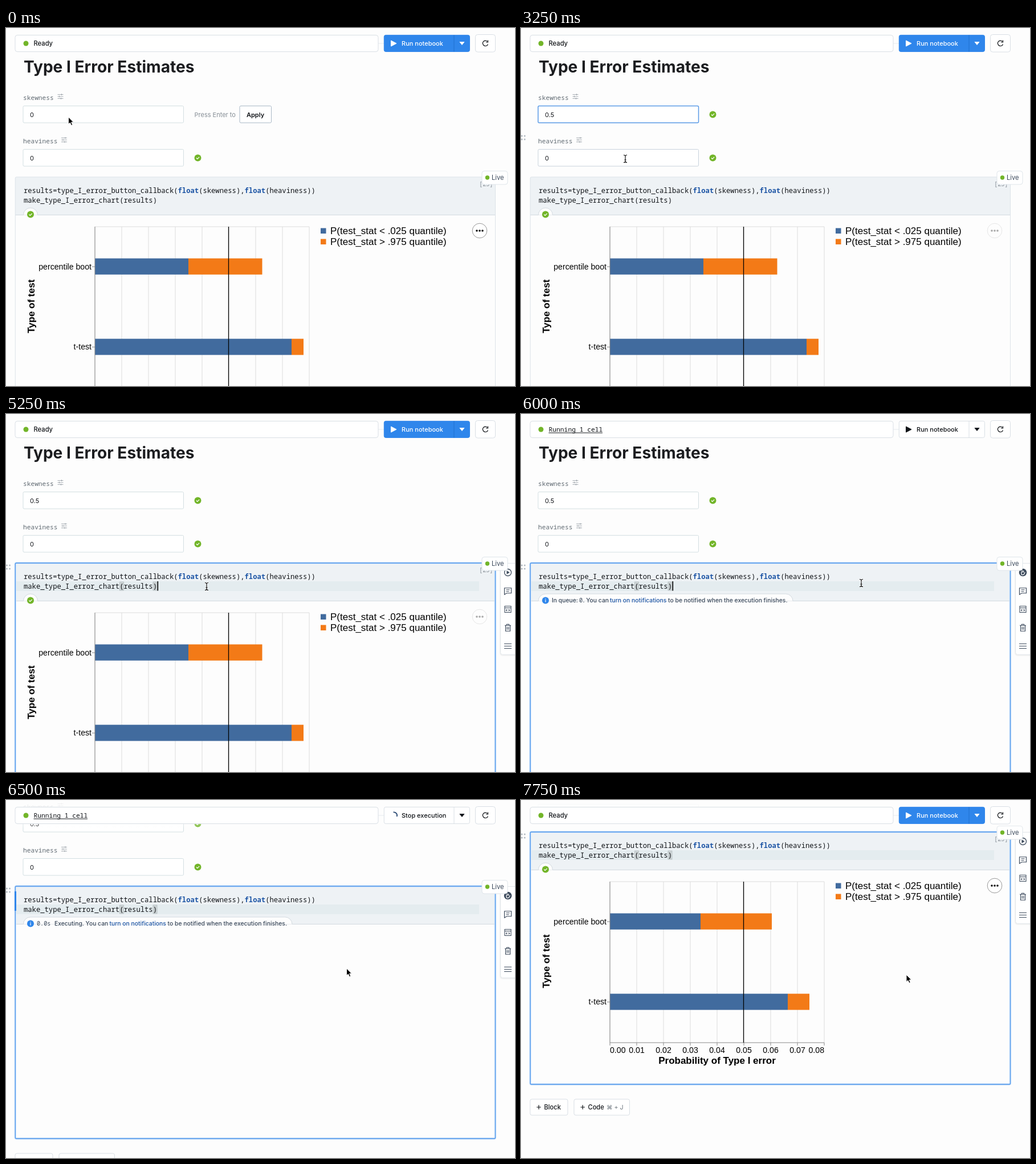
An HTML page for the animation above (8 s loop, 893 by 627 pixels).

```html
<!DOCTYPE html>
<html lang="en">
<head>
<meta charset="utf-8">
<style>
html, body { margin: 0; width: 100%; height: 100%; overflow: hidden; background: #fdfdfd; }
svg { display: block; width: 893px; height: 627px; font-family: Inter, sans-serif; }
.mono { font-family: "Noto Sans Mono", "DejaVu Sans Mono", monospace; }
.chart { font-family: "Liberation Sans", Arial, sans-serif; }
</style>
</head>
<body>
<svg id="stage" viewBox="0 0 893 627"></svg>
<script>
const STEP = 250, STEPS = 32;
const INK = '#111418', SLATE = '#3c4a5c', GRAY = '#6c757d', LINE = '#d9dfe5',
      BLUE = '#2f86eb', LINK = '#1d55a5', GREEN = '#72b529', PAPER = '#fdfdfd';

// [step, x, y], linear in between
const mouse = [[0, 109.5, 156], [1, 105, 153], [2, 90, 152], [10, 90, 152], [13, 183, 229],
  [15, 250, 280], [17, 352, 302], [21, 352, 302], [24, 597, 296], [25, 597.5, 295],
  [29, 597.5, 295], [31, 676, 306]];
const scrollStops = [[24, 0], [25, 40], [26, 110], [27, 160], [28, 187], [29, 202], [30, 205]];

function along(stops, s, i) {
  let a = stops[0];
  for (const b of stops) {
    if (s <= b[0]) return b === a ? a[i] : a[i] + (b[i] - a[i]) * (s - a[0]) / (b[0] - a[0]);
    a = b;
  }
  return a[i];
}

const text = (x, y, str, size = 11, fill = INK, more = '') =>
  `<text x="${x}" y="${y}" font-size="${size}" fill="${fill}" ${more}>${str}</text>`;
const rect = (x, y, w, h, fill, more = '') =>
  `<rect x="${x}" y="${y}" width="${w}" height="${h}" fill="${fill}" ${more}/>`;
const box = (x, y, w, h, stroke = LINE, r = 3, width = 1) =>
  rect(x, y, w, h, '#fff', `rx="${r}" stroke="${stroke}" stroke-width="${width}"`);
const path = (d, stroke = INK, width = 1, fill = 'none') =>
  `<path d="${d}" fill="${fill}" stroke="${stroke}" stroke-width="${width}"/>`;
const dot = (x, y, r, fill, more = '') => `<circle cx="${x}" cy="${y}" r="${r}" fill="${fill}" ${more}/>`;
const at = (x, y, body, angle = 0) => `<g transform="translate(${x} ${y}) rotate(${angle})">${body}</g>`;
const mono = 'class="mono"', medium = 'font-weight="500"', semi = 'font-weight="600"';

const check = (x, y) => dot(x, y, 6, GREEN) + path(`M${x - 2.6} ${y}l1.9 1.9 3.4-3.5`, '#fff', 1.3);
const sliders = (x, y) => path(`M${x - 5} ${y - 3.5}h10m-10 3.5h10m-10 3.5h10M${x + 2} ${y - 5}v3m-4 .5v3m3 .5v3`, '#939ba3', .8);

function field(name, y, value, border, width, done, iconX) {
  return text(30, y - 26, name, 11.2, '#606a72', mono) + sliders(iconX, y - 31.5) +
    box(30, y - 15, 281.5, 29.5, border, 2, width) + text(42, y + 4, value) +
    (done ? check(336.5, y) :
      text(330.5, y + 4, 'Press Enter to', 11, '#868e96') + box(410, y - 15, 55.5, 29.5, '#a9b8c6', 2) +
      text(422, y + 4, 'Apply', 11, INK, semi));
}

function code(active, caret) {
  const kw = `<tspan fill="${LINK}" font-weight="600">float</tspan>`;
  let out = '';
  if (active) {
    out += rect(17, 293, 813, 17, '#e4ecef');
    for (const x of [199.5, 258]) out += rect(x, 294, 7, 15, '#cdd4d6', 'stroke="#b0b8ba" stroke-width=".7"');
  }
  out += text(31, 288.5, `results=type_I_error_button_callback(${kw}(skewness),${kw}(heaviness))`, 12.2, INK, mono) +
    text(31, 305.5, 'make_type_I_error_chart(results)', 12.2, INK, mono);
  return out + (caret ? rect(265.5, 293, 1.6, 16.5, '#000') : '');
}

function badge(right) {
  return path(`M30.5 327.5A12.5 12.5 0 0 1 43 315H${right - 12.5}A12.5 12.5 0 0 1 ${right} 327.5`, '#d3dae0', 1, PAPER);
}

function notice(seconds) {
  const queued = seconds < 0, x = queued ? 156 : 181.5, y = 330.3, size = 10.35;
  return badge(queued ? 477 : 502) + dot(43, 326.5, 6, BLUE) + path('M43 325.5v4m0-6.3v1.2', '#fff', 1.2) +
    (queued
      ? text(54, y, 'In queue:', size, SLATE, medium) + text(102, y, '0', size, SLATE, mono) +
        text(108.5, y, '. You can', size, SLATE, medium)
      : text(54, y, seconds.toFixed(1) + 's', 10.2, SLATE, mono) +
        text(85, y, 'Executing. You can', size, SLATE, medium)) +
    text(x, y, `<tspan fill="${LINK}">turn on notifications</tspan> to be notified when the execution finishes.`, size, SLATE, medium);
}

function chart(bars, menuOn) {
  const tickX = i => 156 + 47 * i;
  let out = '';
  for (let i = 0; i <= 8; i++) {
    out += path(`M${tickX(i)} 348V630`, '#dcdcdc') + path(`M${tickX(i)} 630v5`, '#888');
    const anchor = i === 0 ? 'start' : i === 8 ? 'end' : 'middle';
    out += text(tickX(i), 647.5, '0.0' + i, 14.15, '#000', `text-anchor="${anchor}"`);
  }
  out += path('M156 348H532', '#dcdcdc');
  bars.forEach(([mid, end], i) => {
    const y = 403.5 + 140.8 * i;
    out += rect(156, y, mid - 156, 28.3, '#416b9e') + rect(mid, y, end - mid, 28.3, '#f37a17') +
      path(`M151 ${y + 14.5}h5`, '#888') +
      text(150, y + 19, ['percentile boot', 't-test'][i], 14.15, '#000', 'text-anchor="end"');
  });
  out += path('M156 348V630H532', '#888') + path('M390.5 348V630', '#000', 1.3) +
    text(344, 667, 'Probability of Type I error', 17, '#000', 'text-anchor="middle" font-weight="700"') +
    at(50, 487.5, text(0, 0, 'Type of test', 17, '#000', 'text-anchor="middle" font-weight="700"'), -90);
  ['&lt; .025', '&gt; .975'].forEach((range, i) => {
    out += rect(552, 350.5 + 19 * i, 9.5, 9.5, ['#416b9e', '#f37a17'][i]) +
      text(569, 360.6 + 19 * i, `P(test_stat ${range} quantile)`, 17, '#000');
  });
  const dots = [-5, 0, 5].map(d => dot(831 + d, 355, 1.8, '#111')).join('');
  return `<g class="chart">${out}</g><g opacity="${menuOn ? 1 : .35}">` +
    dot(831, 355, 12.8, '#fff', `stroke="${menuOn ? '#999' : '#bbb'}"`) + dots + '</g>';
}

function toolbar(running) {
  const play = running
    ? dot(0, 0, 6.8, SLATE) + path('M-2.6 0v2.2q0 2 2.5 2 2 0 2.8-2.2l1-2.5M-2.5 1v-3m1.8 2v-3.5m1.8 3.5v-3', '#fff', 1.2)
    : dot(0, 0, 6, 'none', `stroke="${SLATE}" stroke-width="1.3"`) + path('M-1.8-2.8L2.8 0-1.8 2.8z', SLATE, .5, SLATE);
  const icons = [play,
    path('M-6-5H6V4H-2L-6 6.5zM-3-2H3M-3 1H2', SLATE, 1.2),
    path('M-5.5-5.5H5.5V5.5H-5.5zM-5.5-2.5H5.5M-1.2 0L-3 1.7-1.2 3.3M1.2 0L3 1.7 1.2 3.3', SLATE, 1.1),
    path('M-5.5-4H5.5M-2-4V-6H2V-4M-4-4V6H4V-4M-1.3-1.5V3.5M1.3-1.5V3.5', SLATE, 1.2),
    path('M-6.5-4H6.5M-6.5 0H6.5M-6.5 4H6.5', SLATE, 1.2)];
  return rect(866, 262, 40, 162, '#000', 'rx="5" opacity=".04"') + box(867.5, 261.5, 40, 160, '#e1e6ea', 4) +
    icons.map((icon, i) => at(880.5, 277.5 + 32.25 * i, icon)).join('');
}

function cell(s) {
  const active = s >= 17, running = s >= 24 && s < 30, executing = s >= 26 && running;
  const bars = s < 30 ? [[320, 449.5], [501, 522]] : [[315, 440], [468, 506]];
  let out = rect(16.5, 261, 842, 66.5, '#eef2f5') + path('M16 327.5H859', '#d3dae0') +
    code(active, active && !(s > 21 && s % 5 === 1));
  out += running ? notice(executing ? (s - 26) * 1.1 : -1)
    : badge(55.5) + check(43, 326.5) + chart(bars, s === 0 || s === 31);
  const frame = (color, width) => rect(16.3, 261, 842.2, 442, 'none', `rx="2" stroke="${color}" stroke-width="${width}"`);
  out += active ? frame('#cfe4fc', 3.6) + frame('#4f97ea', 1.3) : frame('#dde3e9', 1);
  if (executing) out += rect(15, 270, 3, 34 + (s - 26) * 5.5, BLUE);
  if (active) out += toolbar(running);
  if (!running) out += text(830, 277, s < 30 ? '[23]' : '[25]', 10.3, '#868e96', mono);
  return out + box(835, 250.5, 45, 23.5, '#dfe5ea', 4) + dot(844.5, 262, 3.7, GREEN) + text(852, 266, 'Live', 11.2, SLATE);
}

function header(s) {
  const running = s >= 24 && s < 30, stopping = s >= 26 && running, ink = running ? INK : '#fff';
  const spinner = at(680.5, 27, path('M-1-5.6A5.6 5.6 0 0 1 5.2 2', '#2b4a74', 1.7), (s - 26) * 105);
  return path('M653 27h10', '#e6eaee') + box(16, 12.5, 637, 29, LINE, 4) + dot(35, 27, 4.5, GREEN) +
    (running
      ? text(48.5, 31, 'Running 1 cell', 11.3, INK, mono) + path('M48.5 33H143', INK, 1)
      : text(48.5, 31, 'Ready', 11.2, INK, medium)) +
    rect(663.3, 12.4, 150.2, 29, running ? '#fff' : BLUE, `rx="3" stroke="${running ? LINE : BLUE}"`) +
    path('M786 12.4V41.4', running ? LINE : '#2070cf') +
    (stopping ? spinner : path('M675.5 22L685 27 675.5 32z', ink, 1, ink)) +
    text(694, 31, stopping ? 'Stop execution' : 'Run notebook', 11, ink, medium) +
    path('M796 24.5H804L800 29.5z', ink, .8, ink) +
    box(823.5, 11.5, 35, 30.5, LINE, 4) +
    path('M844.5 23.5A4.7 4.7 0 1 0 845.5 28.5M845.5 21.5V25H842', INK, 1.2);
}

function pointer(s) {
  const x = along(mouse, s, 1), y = along(mouse, s, 2), arrow = s === 0 || s >= 25;
  if (arrow) return at(x, y, path('M0 0V12.5L2.9 9.9 5 14.6 7.2 13.6 5.2 9H9z', '#fff', 1, '#000'));
  const beam = 'M-3-6.5Q0-6.5 0-4.5 0-6.5 3-6.5M0-5V5M-3 6.5Q0 6.5 0 4.5 0 6.5 3 6.5M-1.5 2H1.5';
  return at(x, y, path(beam, '#fff', 2.6) + path(beam, '#000', 1.1));
}

function grip(y) {
  return [1.5, 6.5].map(x => dot(x, y - 3, 1.5, '#b3bbc2') + dot(x, y + 3, 1.5, '#b3bbc2')).join('');
}

function button(x, w, label, hint = '') {
  return box(x, 729, w, 28, LINE) + path(`M${x + 11.5} 743h7.5m-3.75-3.75v7.5`, INK, 1.2) +
    text(x + 24.5, 747, label, 11.1, INK, medium) + text(x + 57, 747, hint, 10.6, GRAY);
}

function scene(s) {
  const focused = s >= 2 && s < 17, value = s < 5 ? '0' : s === 5 ? '0.' : '0.5';
  const page = text(31, 77.5, 'Type I Error Estimates', 28.1, '#1c1d20', 'font-weight="700"') +
    field('skewness', 151.5, value, focused ? '#5b9be6' : '#d3dfe2', focused ? 1.5 : 1, s >= 9, 95.5) +
    field('heaviness', 227.5, '0', s >= 12 && s < 15 ? '#c8d2dc' : '#d3dfe2', 1, true, 102) +
    (s >= 15 ? grip(268) : s >= 11 ? grip(192) : '') +
    cell(s) + button(16, 66, 'Block') + button(93, 97.5, 'Code', '⌘ + J');
  return `<defs><linearGradient id="fade" x2="0" y2="1"><stop offset=".6" stop-color="${PAPER}" stop-opacity=".87"/>` +
    `<stop offset="1" stop-color="${PAPER}" stop-opacity="0"/></linearGradient></defs>` +
    at(0, -along(scrollStops, s, 1), page) + rect(0, 0, 893, 50, 'url(#fade)') + header(s) + pointer(s);
}

const stage = document.getElementById('stage');
let shown = -1;
function tick() {
  const s = Math.floor(performance.now() / STEP) % STEPS;
  if (s !== shown) stage.innerHTML = scene(shown = s);
  requestAnimationFrame(tick);
}
tick();
</script>
</body>
</html>
```
